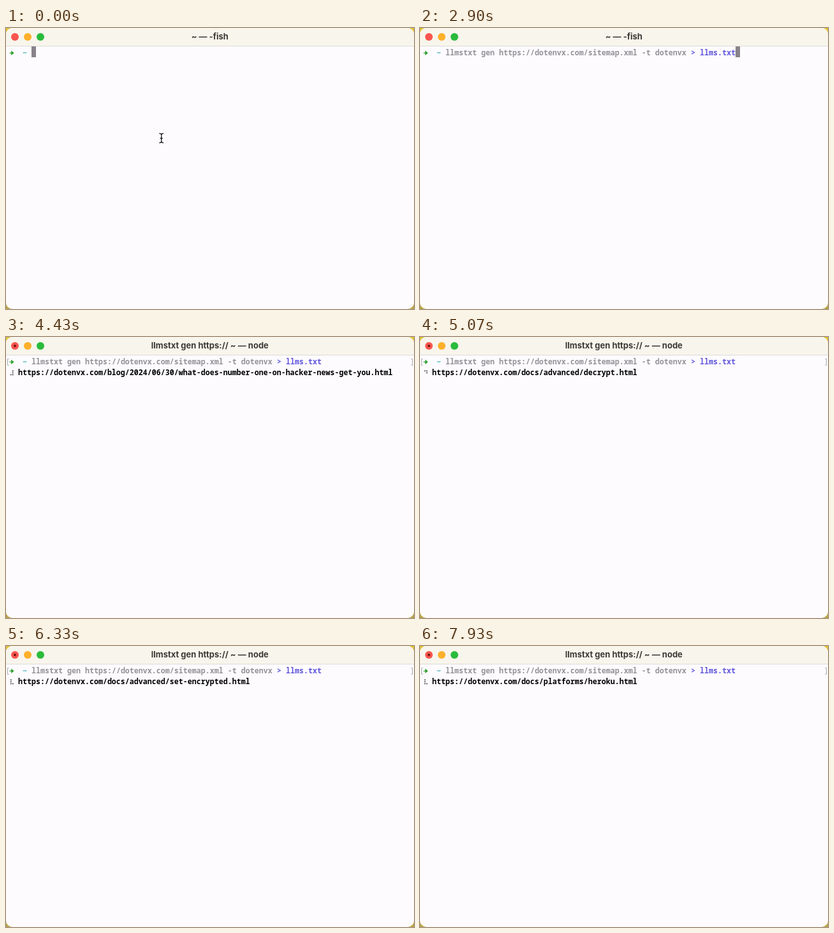
An HTML page that plays this animation: 640x442 px, repeating every 8000 ms.

```html
<!DOCTYPE html>
<html lang="en">
<head>
<meta charset="utf-8">
<title>Terminal</title>
<style>
  html, body { margin: 0; width: 100%; height: 100%; overflow: hidden; }
  svg { display: block; width: 640px; height: 442px; }
  .mono { font: 700 11.667px "Noto Sans Mono", "Liberation Mono", monospace; white-space: pre; }
  #title { font: 700 13px Inter, "Open Sans", sans-serif; fill: #3b3835; text-anchor: middle; }
</style>
</head>
<body>
<svg viewBox="0 0 640 442" xmlns="http://www.w3.org/2000/svg">
  <defs>
    <linearGradient id="desk" x2="0" y2="1">
      <stop stop-color="#dfc33c"/>
      <stop offset="1" stop-color="#b9a347"/>
    </linearGradient>
    <clipPath id="frame"><rect width="640" height="442" rx="10"/></clipPath>
  </defs>
  <rect width="640" height="442" fill="url(#desk)"/>
  <g clip-path="url(#frame)">
    <rect width="640" height="442" fill="#fdfbfe"/>
    <rect width="640" height="28" fill="#f8f5ec"/>
    <rect y="28" width="640" height="1" fill="#dddbd8"/>
  </g>
  <circle cx="14" cy="14" r="6" fill="#f9564f"/>
  <circle id="busyDot" cx="14" cy="14" r="2" fill="#6f1512"/>
  <circle cx="34" cy="14" r="6" fill="#fdb02b"/>
  <circle cx="54" cy="14" r="6" fill="#2abb3c"/>
  <text id="title" x="319.8" y="18"></text>

  <path d="M5.5 39.3H9.5M8.8 36.9L11.6 39.3L8.8 41.7Z" fill="#30a02f" stroke="#30a02f" stroke-width="1.3"/>
  <text class="mono" x="26" y="43" fill="#28a6b4">~</text>
  <g id="command" class="mono">
    <text x="40" y="43" fill="#969398">llmstxt gen https://dotenvx.com/sitemap.xml -t dotenvx</text>
    <text x="425" y="43" fill="#6157dc">&gt; llms.txt</text>
  </g>
  <path id="marks" d="M4.5 34.5H2.5V44.5H4.5M635.5 34.5H637.5V44.5H635.5" fill="none" stroke="#a9a7aa"/>
  <rect id="caret" width="7" height="17" fill="#878389"/>
  <g id="dots"></g>
  <text id="url" class="mono" x="19" y="60" fill="#000"></text>

  <g id="pointer" fill="none" stroke-linecap="round">
    <path id="halo" stroke="#fff" stroke-width="3"/>
    <path id="beam" stroke="#111" stroke-width="1.3"/>
  </g>
</svg>
<script>
const LOOP = 8000, PASTE = 700, ENTER = 3770, SPIN = 4095, TICK = 81.4;
const $ = id => document.getElementById(id);

const pages = (dir, names) => names.split(' ').map(n => `https://dotenvx.com/${dir}${n}.html`);
const urls = [
  ...pages('blog/2024/', `06/24/dotenvx-release-candidate 06/26/why-encrypt-env-files
    06/27/dotenvx-v1 06/28/from-dotenv-to-dotenvx
    06/30/what-does-number-one-on-hacker-news-get-you
    07/11/encrypted-env-files 07/25/dotenvx-in-production 08/08/key-rotation`.replace(/\s+/g, ' ')),
  ...pages('', 'docs/index docs/install docs/quickstart'),
  ...pages('docs/advanced/', `decrypt encrypt get-all get-format-shell
    get-key ls-directory run-convention run-command-substitution
    run-debug run-dotenv-key run-dotenv-private-key run-environment-variables
    run-multiple-files run-override run-quiet run-variable-expansion
    set-encrypted set-plain`.replace(/\s+/g, ' ')),
  ...pages('docs/features/', 'encryption environments run-anywhere secrets settings status sync'),
  ...pages('docs/', 'guides/index languages/nodejs languages/python languages/ruby'),
  ...pages('docs/platforms/', `index cloudflare digital-ocean docker
    fly github-actions gitlab heroku netlify`.replace(/\s+/g, ' '))
];

const beam = 'M240.8 165.8Q243.8 165.8 243.8 168.3Q243.8 165.8 246.8 165.8' +
  'M243.8 168V178.5M240.8 180.6Q243.8 180.6 243.8 178.2Q243.8 180.6 246.8 180.6M242.3 173.5H245.3';
$('halo').setAttribute('d', beam);
$('beam').setAttribute('d', beam);

// Braille dots in Unicode bit order: left column 1-3, right column 4-6.
const spinner = '⠋⠙⠹⠸⠼⠴⠦⠧⠇⠏';
const dots = Array.from({ length: 6 }, (_, i) => {
  const dot = document.createElementNS('http://www.w3.org/2000/svg', 'circle');
  dot.setAttribute('cx', i < 3 ? 7.8 : 10.8);
  dot.setAttribute('cy', 53.3 + (i % 3) * 3);
  dot.setAttribute('r', 0.85);
  $('dots').append(dot);
  return dot;
});

const show = (el, on) => { el.style.display = on ? '' : 'none'; };
const put = (id, text) => { if ($(id).textContent !== text) $(id).textContent = text; };

function draw(t) {
  const pasted = t >= PASTE, busy = t >= ENTER, spinning = t >= SPIN;
  put('title', busy ? 'llmstxt gen https:// ~ — node' : '~ — -fish');
  show($('busyDot'), busy);
  show($('marks'), busy);
  show($('command'), pasted);
  show($('pointer'), !pasted);

  show($('caret'), !spinning);
  $('caret').setAttribute('x', busy ? 5 : pasted ? 495 : 40);
  $('caret').setAttribute('y', busy ? 46 : 29);

  const step = Math.max(0, Math.floor((t - SPIN) / TICK));
  const bits = spinner.charCodeAt(step % spinner.length) - 0x2800;
  dots.forEach((dot, i) => show(dot, spinning && bits >> i & 1));
  put('url', spinning ? urls[Math.min(step, urls.length - 1)] : '');
}

const start = performance.now();
function loop() {
  draw((performance.now() - start) % LOOP);
  requestAnimationFrame(loop);
}
loop();
</script>
</body>
</html>
```
